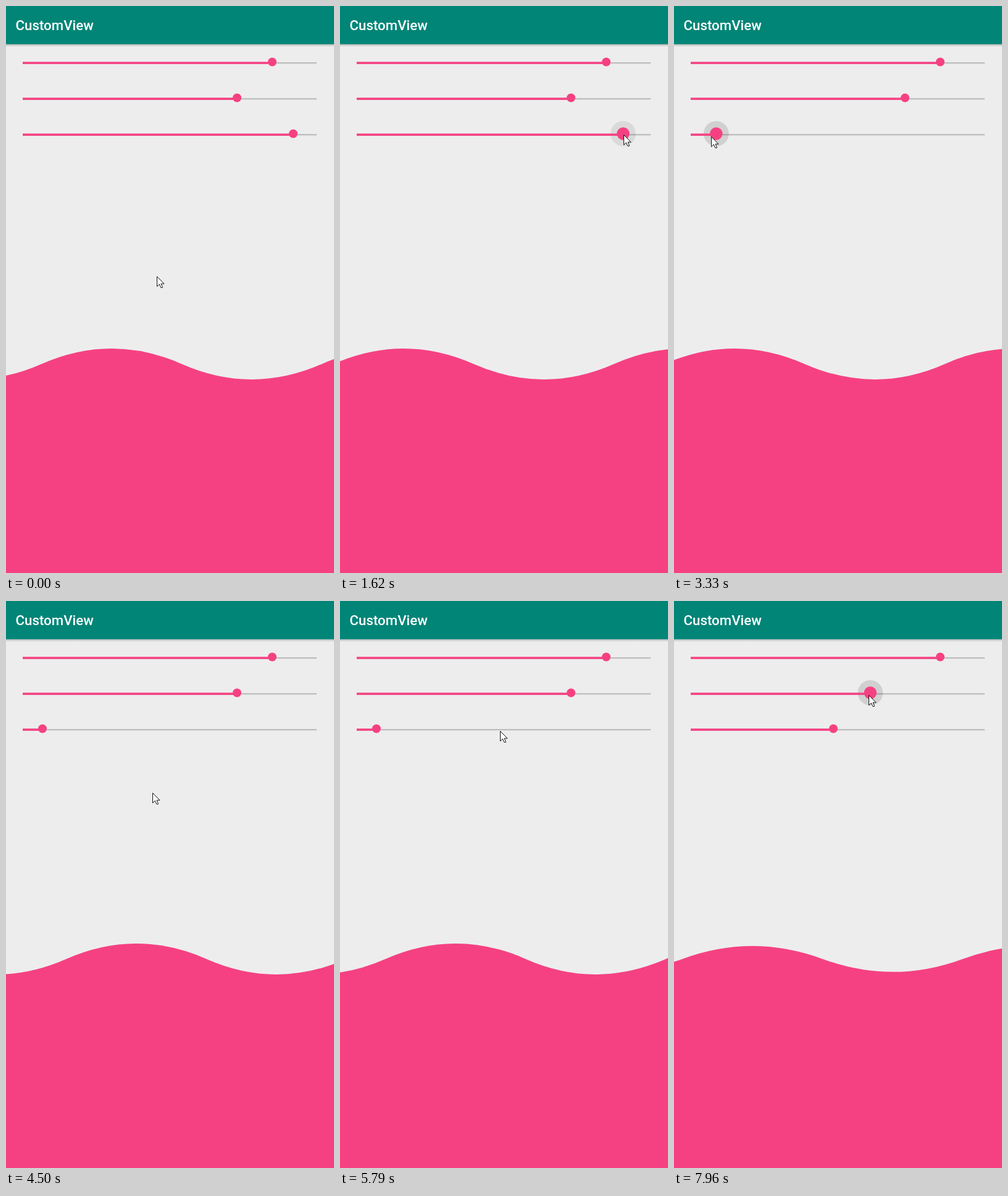
Write an HTML page that moves like this. It is 531x917 px and loops after 8 s.

```html
<!DOCTYPE html>
<html lang="en">
<head>
<meta charset="utf-8">
<title>CustomView</title>
<style>
  html, body { margin: 0; width: 100%; height: 100%; overflow: hidden; background: #ededed; }
  svg { display: block; width: 531px; height: 917px; }
  .title { font: 500 22.3px Roboto, "Noto Sans", sans-serif; fill: #fff; }
  .accent { fill: #f54182; }
</style>
</head>
<body>
<svg viewBox="0 0 531 917">
  <defs>
    <linearGradient id="shade" x2="0" y2="1">
      <stop offset="0" stop-color="#000" stop-opacity=".27"/>
      <stop offset=".5" stop-color="#000" stop-opacity=".09"/>
      <stop offset="1" stop-color="#000" stop-opacity="0"/>
    </linearGradient>
  </defs>
  <rect width="531" height="917" fill="#ededed"/>
  <rect y="61.5" width="531" height="5" fill="url(#shade)"/>
  <rect width="531" height="61.8" fill="#018577"/>
  <text class="title" x="15.5" y="38.5">CustomView</text>
  <path id="wave" class="accent"/>
  <g id="sliders"></g>
  <path id="cursor" d="M.5 .5V16.7L4.3 13L6.9 18.5H9.3V17.2L7 12.2H12Z"
        fill="#fff" stroke="#111" stroke-linejoin="round"/>
</svg>
<script>
const LOOP = 8000;
const REFRESH = 138; // typical ms between screen refreshes
const LEFT = 27, RIGHT = 503;
const WAVELENGTH = 454, MID = 578.9, MAX_BEND = 68.6;
const KNOB_LAG = 40; // the dragged knob trails the pointer

// Distance travelled by one wave crest: [time, x]
const CREST = [[0, 171], [1620, 1011], [3330, 1914], [4500, 2481],
  [5790, 2911], [6900, 3320], [7960, 3759]];

const POINTER_START = [244, 437];
// Pointer moves: [from, to, x, y]
const MOVES = [[150, 1110, 459.4, 208], [1620, 3330, 60, 211], [3900, 4450, 237, 310],
  [4550, 5520, 259, 210], [6560, 6900, 366, 170], [6950, 7400, 375, 152], [7480, 7950, 315, 152]];

const SLIDERS = [
  { start: 431, touches: [] },
  { start: 374, touches: [{ from: 7450, to: LOOP }] },
  { start: 465, touches: [{ from: 1400, to: 3800 }, { from: 6340, to: 6350 }] }
];

const clamp = v => Math.max(0, Math.min(1, v));
const mix = (a, b, p) => a + (b - a) * p;

function crestAt(t) {
  const i = Math.max(1, CREST.findIndex(k => k[0] >= t));
  const [t0, x0] = CREST[i - 1], [t1, x1] = CREST[i];
  return mix(x0, x1, (t - t0) / (t1 - t0)) % WAVELENGTH;
}

function pointerAt(t) {
  return MOVES.reduce(([px, py], [from, to, x, y]) => {
    const p = clamp((t - from) / (to - from));
    return [mix(px, x, p), mix(py, y, p)];
  }, POINTER_START);
}

// Even refreshes between the crest keys
function refreshTime(t) {
  const i = CREST.findIndex(k => k[0] > t);
  if (i < 0) return CREST[CREST.length - 1][0];
  const start = CREST[i - 1][0], span = CREST[i][0] - start;
  const size = span / Math.round(span / REFRESH);
  return start + Math.floor((t - start) / size) * size;
}

function knobAt(slider, t) {
  const touch = slider.touches.filter(k => k.from <= t).pop();
  return touch ? pointerAt(Math.min(t, touch.to) - KNOB_LAG)[0] - 1 : slider.start;
}

function pressAt(slider, t) {
  const levels = slider.touches.map(({ from, to }) =>
    clamp(Math.min((Math.min(t, to) - from) / 320, (to + 300 - t) / 300)));
  return Math.max(0, ...levels);
}

function set(node, attrs) {
  for (const name in attrs) node.setAttribute(name, attrs[name]);
}

function add(parent, tag, attrs) {
  const node = document.createElementNS("http://www.w3.org/2000/svg", tag);
  set(node, attrs);
  return parent.appendChild(node);
}

const wave = document.getElementById("wave");
const cursor = document.getElementById("cursor");
const group = document.getElementById("sliders");

SLIDERS.forEach((s, i) => {
  const y = 92 + 58 * i;
  s.ripple = add(group, "circle", { cy: y - 1.6, r: 20.4 });
  add(group, "rect", { x: LEFT, y: y - 1, width: RIGHT - LEFT, height: 2.3, opacity: .2 });
  s.bar = add(group, "rect", { class: "accent", x: LEFT, y: y - 1.7, height: 3.6 });
  s.knob = add(group, "circle", { class: "accent", cy: y - 1.5 });
});

function drawSlider(s, t) {
  const x = knobAt(s, t), press = pressAt(s, t);
  set(s.ripple, { cx: x, opacity: .12 * press });
  set(s.bar, { width: x - LEFT });
  set(s.knob, { cx: x, r: 7 + 3.2 * clamp(press * 2) });
}

function drawWave(t) {
  const half = WAVELENGTH / 2;
  const bend = MAX_BEND * (knobAt(SLIDERS[1], t) - LEFT) / (RIGHT - LEFT);
  let d = `M${crestAt(t) - half / 2 - WAVELENGTH} ${MID}`;
  for (let i = 0; i < 6; i++) d += `q${half / 2} ${i % 2 ? bend : -bend} ${half} 0`;
  set(wave, { d: d + "V917H-600Z" });
}

function drawCursor(t) {
  const [x, y] = pointerAt(t).map(Math.round);
  set(cursor, { transform: `translate(${x} ${y})` });
}

function draw() {
  const t = refreshTime(performance.now() % LOOP);
  SLIDERS.forEach(s => drawSlider(s, t));
  drawWave(t);
  drawCursor(t);
  requestAnimationFrame(draw);
}
draw();
</script>
</body>
</html>
```
